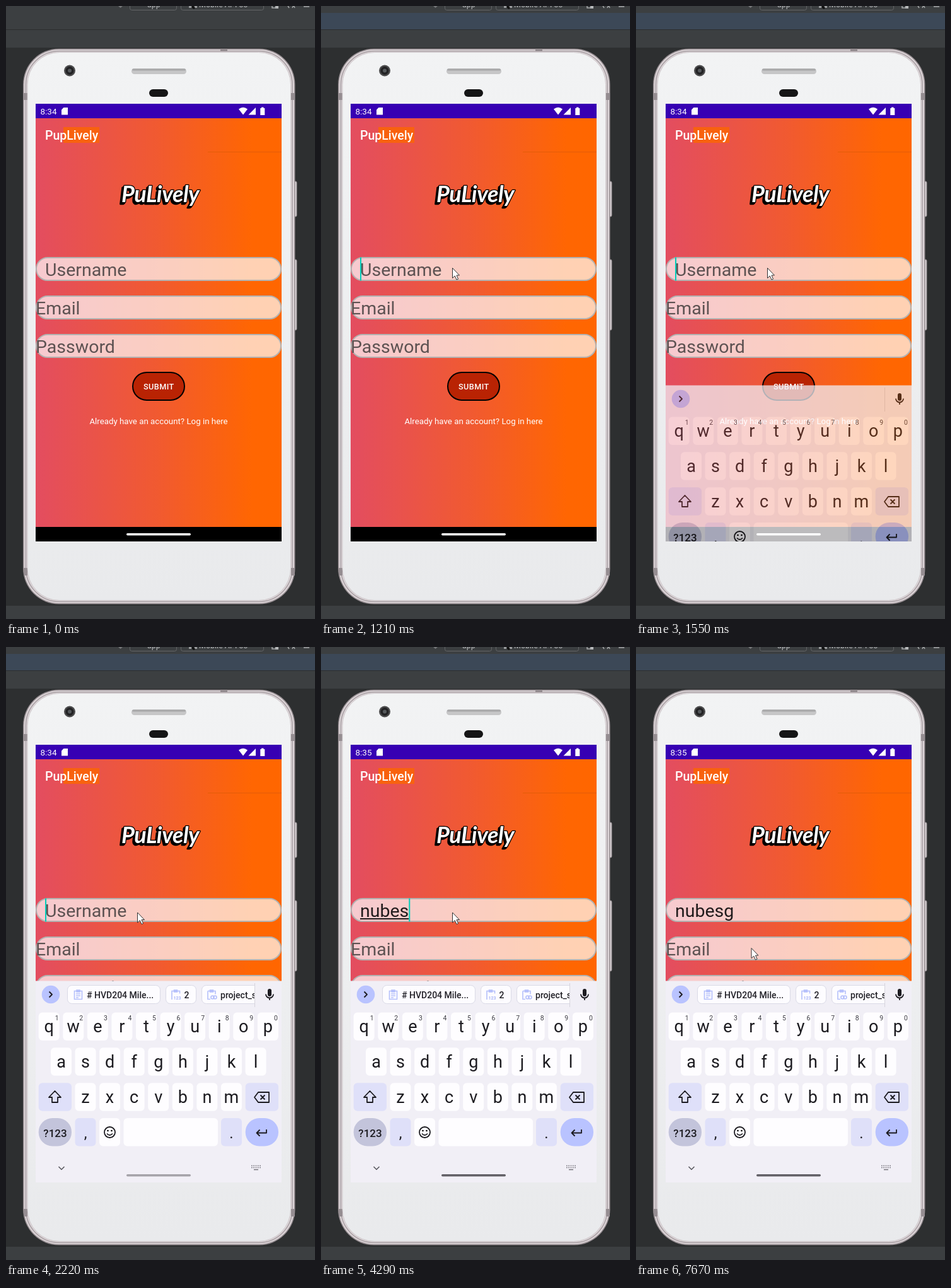
Recreate the animation shown at these times as an HTML page. Size 490 by 972 pixels, loop 8000 ms.

```html
<!DOCTYPE html>
<html lang="en">
<head>
<meta charset="utf-8">
<title>Sign up form</title>
<style>
html, body { margin: 0; width: 100%; height: 100%; overflow: hidden; background: #2d2f30; }
svg { display: block; width: 100vw; height: 100vh; }
text { font-family: Roboto, "Liberation Sans", sans-serif; white-space: pre; }
.field rect { fill: rgba(255,255,255,.7); stroke: #b3b2b1; stroke-width: 2; }
.entry { font-size: 28.5px; }
.hint { fill: #5d5252; }
.logo text { font: italic 700 36px Lato, sans-serif; letter-spacing: -.5px; }
.line { fill: none; stroke: #1c1b20; stroke-width: 1.8; stroke-linejoin: round; }
.chip rect { fill: #fdfcff; stroke: #dadae6; }
.chip text { font-size: 14px; font-weight: 500; fill: #222127; }
.clip { fill: none; stroke: #b5c0fb; stroke-width: 1.6; }
.key { font-size: 27px; fill: #1c1b20; text-anchor: middle; }
.digit { font-size: 10.5px; fill: #3c3b43; text-anchor: middle; }
</style>
</head>
<body>
<svg viewBox="0 0 490 972" preserveAspectRatio="none">
  <defs>
    <linearGradient id="sunset">
      <stop offset="0" stop-color="#e34d60"/>
      <stop offset=".5" stop-color="#f15a30"/>
      <stop offset=".88" stop-color="#ff6602"/>
      <stop offset="1" stop-color="#ff6600"/>
    </linearGradient>
    <linearGradient id="shell" x2="0" y2="1">
      <stop offset="0" stop-color="#f2f3f4"/>
      <stop offset="1" stop-color="#e9eaec"/>
    </linearGradient>
    <clipPath id="screen"><rect x="47" y="155" width="390" height="694"/></clipPath>
    <clipPath id="strip"><rect x="90" y="530" width="304" height="45"/></clipPath>
  </defs>

  <!-- tool window -->
  <rect width="490" height="972" fill="#2d2f30"/>
  <rect width="490" height="66" fill="#3c3f41"/>
  <rect y="951" width="490" height="21" fill="#3c3f41"/>
  <rect id="header" y="11" width="490" height="26" fill="#3c3f41"/>
  <path d="M0 37.5H490" stroke="#2b2d2e"/>
  <g fill="none" stroke="#646668">
    <rect x="196.5" y="-16" width="74" height="22.5" rx="3"/>
    <rect x="277.5" y="-16" width="131" height="22.5" rx="3"/>
  </g>
  <g font-size="12.5" fill="#b9bbbd">
    <text x="224" y="2">app</text>
    <text x="306" y="2">Mobile API 33</text>
  </g>
  <path d="M178 0h7l-3.500 3z" fill="#77797b"/>
  <path d="M290 0h4v3h-4zM299 0h4v3h-4z" fill="#9a9c9e"/>
  <path d="M295 -2l5 5-2 2-3-2z" fill="#111"/>
  <path d="M422 0v3h5M447 0l2 3M454 3l2-4 2 4M472 1h9" fill="none" stroke="#a9abad" stroke-width="1.500"/>
  <path d="M427 0h5v4h-5z" fill="#b4b6b8"/>

  <!-- handset -->
  <rect x="455" y="278" width="6" height="56" rx="2" fill="#d8d2d5" stroke="#8f898c"/>
  <rect x="455" y="402" width="6" height="112" rx="2" fill="#d8d2d5" stroke="#8f898c"/>
  <rect x="27" y="67.500" width="431.500" height="881" rx="57" fill="#958d91"/>
  <rect x="28.500" y="69" width="428.500" height="878" rx="55.500" fill="#ddd5d8"/>
  <rect x="31.500" y="71.500" width="422.500" height="873" rx="53" fill="none" stroke="#a79fa3" stroke-width="1.500"/>
  <g fill="#958d91">
    <path d="M28 138h6v11h-6zM452 138h6v11h-6zM28 891h6v12h-6zM452 891h6v12h-6zM340 68h11v4h-11z"/>
  </g>
  <rect x="34" y="73.500" width="417.500" height="869" rx="51" fill="url(#shell)" stroke="#cfc9cc"/>
  <circle cx="101" cy="102.500" r="9" fill="#4b4b4c"/>
  <circle cx="101" cy="102.500" r="6.500" fill="#222224"/>
  <circle cx="101" cy="102.500" r="3" fill="#55595c"/>
  <rect x="199" y="99" width="87" height="9" rx="4.500" fill="#c6c6c7"/>
  <rect x="200" y="99.500" width="85" height="3" rx="1.500" fill="#a9a9aa"/>
  <rect x="227" y="132" width="30" height="12" rx="6" fill="#151516"/>

  <g clip-path="url(#screen)">
    <rect x="47" y="155" width="390" height="694" fill="url(#sunset)"/>
    <rect x="47" y="155" width="390" height="23" fill="#3700b3"/>
    <rect x="47" y="826" width="390" height="23"/>
    <text id="clock" x="54.500" y="171.500" font-size="13.500" fill="#fff"></text>
    <g fill="#fff">
      <path d="M91.500 161h6.500v11.500H88v-8z"/>
      <path d="M369 163.500q7-5.500 14 0l-7 9z"/>
      <path d="M396 161v11.500h-11.500z"/>
      <path d="M405 160.500h3.500v1.500h1.800v11h-7v-11h1.700z"/>
    </g>
    <path d="M320 231.500H437" stroke="#e35c08"/>
    <rect x="91" y="192" width="57" height="25" fill="#f8620f"/>
    <text x="62" y="212" font-size="19.500" font-weight="500" fill="#fff">PupLively</text>
    <g class="logo">
      <g stroke="#000" stroke-width="2.500" stroke-linejoin="round">
        <text x="180" y="313.500">PuLively</text>
        <text x="181.500" y="312.500">PuLively</text>
        <text x="183" y="311">PuLively</text>
      </g>
      <text x="183" y="311" fill="#fff">PuLively</text>
    </g>
    <g class="field">
      <rect x="48" y="399" width="388" height="36" rx="18"/>
      <rect x="48" y="460" width="388" height="36" rx="18"/>
      <rect x="48" y="521" width="388" height="36" rx="18"/>
    </g>
    <text id="name" class="entry" x="62" y="428"></text>
    <rect id="mark" x="62" y="430" height="2" fill="#241e1f"/>
    <rect id="nameCaret" y="398.500" width="2" height="37" fill="#03cdb9"/>
    <text class="entry hint" x="47" y="489">Email</text>
    <rect id="mailCaret" x="47" y="459.500" width="2" height="37" fill="#03cdb9"/>
    <text class="entry hint" x="47" y="550">Password</text>
    <rect x="201" y="581" width="82" height="44" rx="22" fill="#b92303" stroke="#000" stroke-width="2"/>
    <text x="242.300" y="608" font-size="12.700" font-weight="500" letter-spacing=".4" text-anchor="middle" fill="#fff">SUBMIT</text>
    <text x="242" y="663" font-size="13.300" text-anchor="middle" fill="#fff">Already have an account? Log in here</text>

    <g id="board">
      <rect x="47" y="529.500" width="390" height="340" fill="#f1eff6"/>
      <g id="keys"></g>
      <circle cx="71" cy="551" r="14.300" fill="#b9c3ff"/>
      <path class="line" d="M68.500 546.500l4.500 4.500-4.500 4.500"/>
      <path d="M394.500 533V571" stroke="#d6d4dc"/>
      <g id="chips" clip-path="url(#strip)">
        <g class="chip">
          <rect x="97.500" y="536.500" width="147" height="29" rx="7"/>
          <rect x="253.500" y="536.500" width="48" height="29" rx="7"/>
          <rect x="310.500" y="536.500" width="120" height="29" rx="7"/>
          <text x="128" y="557"># HVD204 Mile...</text>
          <text x="282.500" y="557">2</text>
          <text x="340" y="557">project_s</text>
        </g>
        <g class="clip">
          <path d="M108.500 545.500h12v13h-12zM112 544h5v3h-5zM111 550h7M111 553h7M111 556h4"/>
          <path d="M263 559v-13.500h12.500v4M266.500 544h5v3h-5z"/>
          <path d="M320 545.500h12v5M320 545.500v13h4M323.500 544h5v3h-5z"/>
          <rect x="325" y="553" width="5" height="5" rx="2.500"/>
          <rect x="329" y="553" width="5" height="5" rx="2.500"/>
        </g>
        <text x="265.500" y="559" font-size="7" font-weight="700" fill="#a9b6f8">123</text>
      </g>
      <rect x="415" y="542" width="6" height="12" rx="3" fill="#1c1b20"/>
      <path class="line" d="M412 550.500a6 6 0 0 0 12 0M418 557v3"/>
      <path class="line" d="M77.500 704l-9.500 10h5v8h9v-8h5z"/>
      <path class="line" d="M400 706h17v16h-17l-6-8zM403.500 710.500l7 7M410.500 710.500l-7 7"/>
      <path class="line" d="M413 765v5.500h-15M402.500 765.500l-5 5 5 5"/>
      <circle class="line" cx="164.500" cy="769.500" r="8.500"/>
      <path class="line" d="M160 771.500q4.500 5 9 0"/>
      <circle cx="161.500" cy="767" r="1.300"/><circle cx="167.500" cy="767" r="1.300"/>
      <path d="M83.500 824l4.500 4.500 4.500-4.500" fill="none" stroke="#55545c" stroke-width="1.500"/>
      <path d="M389 822.500h15M389 825.500h15" stroke="#77767e" stroke-width="1.600" stroke-dasharray="1.700 1.600"/>
      <path d="M393 828.700h7" stroke="#77767e" stroke-width="1.500"/>
    </g>
    <rect id="bar" x="191" y="836" width="102" height="3.500" rx="1.700"/>
  </g>

  <path id="mouse" d="M.5 .5V16.500L4.300 13 7 19 9.600 17.900 7 12H11.500Z" fill="#fff" stroke="#333" stroke-linejoin="round"/>
</svg>
<script>
const LOOP = 8000;
const $ = id => document.getElementById(id);
const set = (el, attrs) => { for (const k in attrs) el.setAttribute(k, attrs[k]); };

function add(tag, attrs, label) {
  const el = document.createElementNS("http://www.w3.org/2000/svg", tag);
  set(el, attrs);
  if (label) el.textContent = label;
  $("keys").append(el);
}

function key(x, y, w, fill, label, size = 27, rx = 6) {
  add("rect", { x, y, width: w, height: 44.5, rx, fill });
  if (label) add("text", { class: "key", x: x + w / 2, y: y + 31.5, style: `font-size:${size}px` }, label);
}

const PITCH = 38.57, WHITE = "#fefdff", TINT = "#dfe0f9";
[["qwertyuiop", 51.7, 579.5], ["asdfghjkl", 71, 635.2], ["zxcvbnm", 109.5, 691.2]].forEach(([row, x, y], r) =>
  [...row].forEach((c, i) => {
    key(x + i * PITCH, y, 33, WHITE, c);
    if (!r) add("text", { class: "digit", x: x + i * PITCH + 29, y: 592 }, String((i + 1) % 10));
  }));
key(51.7, 691.2, 52.3, TINT);
key(379.7, 691.2, 52.3, TINT);
key(51.7, 747, 52.3, "#c3c4db", "", 17, 22);
add("text", { class: "key", x: 78, y: 776.5, style: "font-size:17px;font-weight:500" }, "?123");
key(109.5, 747, 33, TINT, ",", 24);
key(148, 747, 33, WHITE);
key(186.5, 747, 149.5, WHITE);
key(341, 747, 33, TINT, ".", 24);
key(379.7, 747, 52.3, "#b9c3ff", "", 17, 22);

// Each track lists [start, value]; the value holds until the next start.
const tracks = {
  header: [[0, "#3c3f41"], [1070, "#3c4857"]],
  clock: [[0, "8:34"], [4230, "8:35"]],
  name: [[0, ""], [3160, "n"], [3290, "nu"], [3630, "nube"], [4030, "nubes"], [5350, "nubesg"]],
  mark: [[0, 0], [3420, 2], [3630, 3], [3830, 4], [4290, 5], [5480, 6], [5890, 0]],
  nameCaret: [[0, 0], [1140, 1], [1690, 0], [2090, 1], [2690, 0], [3160, 1], [4760, 0], [5150, 1], [5750, 0]],
  mailCaret: [[0, 0], [6020, 1], [6550, 0], [7020, 1], [7540, 0]],
  bar: [[0, "#fff"], [2090, "#cfcdd3"], [2220, "#a5a3a9"], [2490, "#7d7b81"], [2960, "#626066"]],
  board: [[0, [330, 0]], [1410, [215, .2]], [1480, [135, .46]], [1550, [72, .74]], [1620, [30, .92]], [1690, [8, 1]], [1760, [0, 1]]],
  chips: [[0, 0], [1760, .35], [1830, .75], [1890, 1]]
};
const at = (id, t) => tracks[id].findLast(([start]) => start <= t)[1];

// Pointer moves: start, length, steps, then quadratic curve points.
const moves = [
  [140, 670, 10, [444, 958], [255, 640], [208, 415]],
  [2220, 0, 1, [208, 415], [208, 418], [208, 420.5]],
  [5480, 340, 5, [208, 420.5], [199, 455], [182.5, 482]],
  [6820, 0, 1, [182.5, 482], [182.5, 482], [182.5, 481]],
  [7670, 0, 1, [182.5, 481], [182.5, 480], [182.5, 477]]
];

function pointer(t) {
  const move = moves.findLast(m => m[0] <= t);
  if (!move) return [0, -40];
  const [start, span, steps, a, b, c] = move;
  const p = span ? Math.min(1, Math.floor((t - start) / span * steps + .01) / steps) : 1;
  const u = 1 - (1 - p) ** 1.6;
  return [0, 1].map(i => a[i] * (1 - u) ** 2 + 2 * b[i] * u * (1 - u) + c[i] * u * u);
}

function draw(t) {
  const typed = at("name", t), label = $("name");
  set($("header"), { fill: at("header", t) });
  $("clock").textContent = at("clock", t);
  label.textContent = typed || "Username";
  set(label, { fill: typed ? "#211b1c" : "#5d5252" });
  const width = n => n ? label.getSubStringLength(0, n) : 0;
  set($("mark"), { width: width(at("mark", t)) });
  set($("nameCaret"), { x: 62 + width(typed.length), opacity: at("nameCaret", t) });
  set($("mailCaret"), { opacity: at("mailCaret", t) });
  set($("bar"), { fill: at("bar", t) });
  const [drop, alpha] = at("board", t);
  set($("board"), { transform: `translate(0 ${drop})`, opacity: alpha });
  set($("chips"), { opacity: at("chips", t) });
  set($("mouse"), { transform: `translate(${pointer(t)})` });
}

function tick() {
  draw(performance.now() % LOOP);
  requestAnimationFrame(tick);
}
tick();
</script>
</body>
</html>
```
